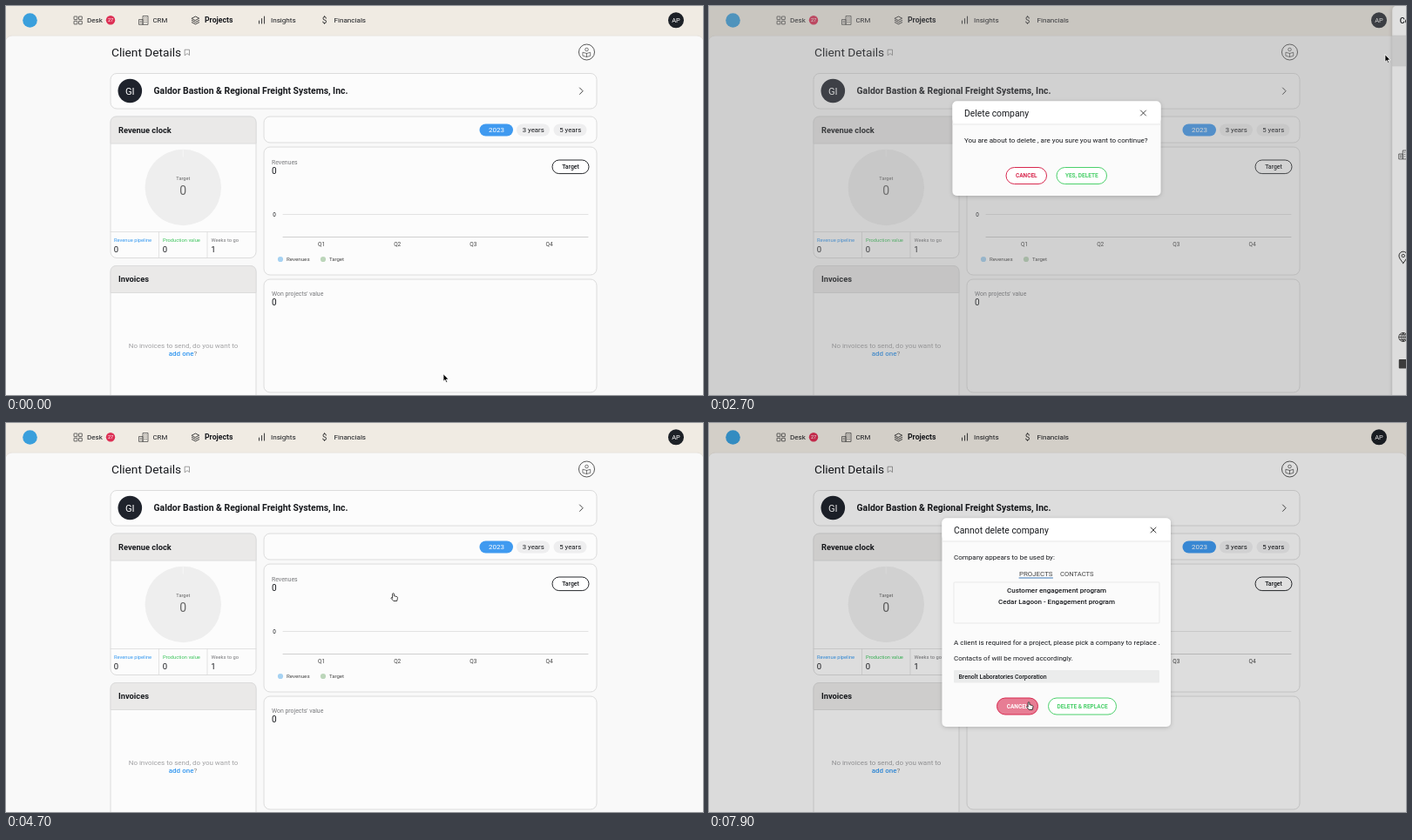
These frames come from a looping animation (800x447 px, 8 s). An HTML page:

```html
<!DOCTYPE html>
<html lang="en">
<head>
<meta charset="utf-8">
<title>Delete company</title>
<style>
html, body { margin: 0; height: 100%; overflow: hidden; background: #f9f9f9; }
svg { display: block; width: 100vw; height: 100vh; font-family: Roboto, "Open Sans", sans-serif; }
text { white-space: pre; }
</style>
</head>
<body>
<svg id="stage" viewBox="0 0 800 447"></svg>
<script>
const INK = '#17191d', GREY = '#77787b', BLUE = '#3498f0', GREEN = '#4bd06b', RED = '#d8294f';
const FIRM = ['Galdor Bastion &', 'Regional Freight', 'Systems, Inc.'];

// Text is placed by the middle of its capitals.
const text = (x, y, size, str, { fill = INK, w = 400, at = 'start', id = '' } = {}) =>
  `<text ${id && `id="${id}"`} x="${x}" y="${y + size * 0.36}" font-size="${size}" font-weight="${w}" fill="${fill}" text-anchor="${at}">${str.replace(/&/g, '&amp;')}</text>`;
const mid = (x, y, size, str, o = {}) => text(x, y, size, str, { ...o, at: 'middle' });
const box = (x, y, x2, y2, r, fill, more = '') =>
  `<rect x="${x}" y="${y}" width="${x2 - x}" height="${y2 - y}" rx="${r}" fill="${fill}" ${more}/>`;
const dot = (x, y, r, fill, more = '') => `<circle cx="${x}" cy="${y}" r="${r}" fill="${fill}" ${more}/>`;
const line = (d, color = '#333', width = 0.8, fill = 'none') =>
  `<path d="${d}" stroke="${color}" stroke-width="${width}" fill="${fill}" stroke-linejoin="round" stroke-linecap="round"/>`;
const group = (id, inner) => `<g id="${id}">${inner}</g>`;
const card = (x, y, x2, y2) => box(x, y, x2, y2, 7, '#fcfcfc', 'stroke="#dcdcdc"');
const headed = (y, y2, title) => card(120, y, 287, y2) +
  `<path d="M120 ${y + 31}V${y + 7}q0-7 7-7h153q7 0 7 7v24z" fill="#eae9e8" stroke="#dcdcdc"/>` +
  text(129, y + 15.5, 9.3, title, { w: 700 });
const cross = (x, y, r) => line(`M${x - r} ${y - r}l${2 * r} ${2 * r}m0 ${-2 * r}l${-2 * r} ${2 * r}`, '#333', 0.9);
const building = (x, y) => line(`M${x} ${y}v-5.5h4.5v5.500zM${x + 4.5} ${y}v-9.5h6v9.5zM${x + 6.3} ${y - 7.3}h.5m1.600 0h.5m-2.600 2.400h.5m1.600 0h.5m-2.600 2.400h.5m1.600 0h.5M${x + 1.6} ${y - 3.6}h1.200m-1.200 1.800h1.200`, '#444', 0.75);
const button = (id, x, x2, y, label, color) =>
  box(x, y - 9.5, x2, y + 9.5, 9.5, '#fff', `stroke="${color}"`) +
  box(x, y - 9.5, x2, y + 9.5, 9.5, color, `id="${id}Fill" opacity="0"`) +
  mid((x + x2) / 2, y, 6.5, label, { fill: color, w: 700, id: id + 'Text' });

const nav = () => box(0, 0, 800, 60, 0, '#f0ebe3') +
  box(-1, 34, 801, 470, 8, '#f9f9f9', 'stroke="#e8e4de"') +
  dot(27.5, 16.5, 8.3, '#3a9fdc') +
  [[78, 12], [83.5, 12], [78, 17.3], [83.5, 17.3]].map(([x, y]) => box(x, y, x + 3.8, y + 3.6, 0.3, 'none', 'stroke="#444" stroke-width=".8"')).join('') +
  text(93, 16.3, 8.1, 'Desk') + dot(120, 16.3, 5.2, '#dd3055') + mid(120, 16.4, 5.5, '27', { fill: '#fff' }) +
  building(152.5, 21) + text(168.5, 16.3, 7.8, 'CRM') +
  line('M213.3 14.2l4.2-2.200 4.200 2.200-4.200 2.200zM213.300 16.500l4.200 2.200 4.200-2.200M213.300 18.700l4.200 2.200 4.200-2.200', '#333', 0.9) +
  text(228, 16.3, 8.7, 'Projects', { w: 700 }) +
  line('M290.5 20v-3M293.5 20v-5.5M296.5 20v-8', '#444', 1.1) + text(304, 16.3, 8.1, 'Insights') +
  mid(365.5, 16.5, 10, '$', { fill: '#333' }) + text(376.5, 16.3, 8.1, 'Financials') +
  dot(769, 16.3, 9, '#1d2127') + mid(769, 16.4, 7.5, 'AP', { fill: '#fff' });

const page = () => nav() +
  text(121, 53, 13.7, 'Client Details') + line('M205.5 50.2h5v6.4l-2.5-2-2.5 2z', '#777', 0.7) +
  dot(666.5, 53, 9, '#fbfbfb', 'stroke="#444" stroke-width=".9"') + dot(666.5, 50, 1.8, 'none', 'stroke="#444" stroke-width=".7"') +
  line('M662.3 53.3l4.2 1.2 4.2-1.2v4l-4.2 1.2-4.2-1.2zM666.5 54.5v4', '#444', 0.7) +
  card(120, 77.5, 678, 118) + dot(142.3, 97.5, 13.8, '#1f232c') + mid(142.3, 97.8, 11.2, 'GI', { fill: '#fff' }) +
  text(169.5, 96.8, 10.4, FIRM.join(' '), { w: 700 }) + line('M658.5 94l3.6 3.7-3.6 3.7', '#444', 1) +
  headed(127, 289.5, 'Revenue clock') + dot(203.3, 208.5, 43.7, '#eeeeee') + line('M203.3 165v8', '#fafafa', 0.6) +
  mid(203.3, 198, 5.6, 'Target', { fill: '#666' }) + mid(203.3, 211.5, 14, '0', { fill: '#666' }) +
  line('M120 259.5h167M175.5 259.5v30M231 259.5v30', '#dcdcdc') +
  [[124, 'Revenue pipeline', BLUE, 0], [180, 'Production value', '#3cc45c', 0], [235.5, 'Weeks to go', GREY, 1]].map(([x, s, fill, n]) =>
    text(x, 269, 5.75, s, { fill }) + text(x - 0.3, 280, 9.5, '' + n)).join('') +
  headed(298.5, 470, 'Invoices') +
  mid(203.5, 390, 8, 'No invoices to send, do you want to', { fill: '#a2a2a4' }) +
  `<text x="203" y="402.3" font-size="8" text-anchor="middle" fill="#888"><tspan fill="${BLUE}" font-weight="500">add one</tspan>?</text>` +
  card(296, 127, 678, 157) + box(543.5, 135.5, 582, 149.5, 7, '#3f9af0') + mid(563, 142.6, 8, '2023', { fill: '#fff' }) +
  [[586, '3 years'], [628.5, '5 years']].map(([x, s]) => box(x, 135.5, x + 38, 149.5, 7, '#eeeeef') + mid(x + 19.2, 142.6, 7.8, s)).join('') +
  card(296, 162, 678, 309) + text(305, 179.3, 6.9, 'Revenues', { fill: GREY }) + text(305, 189, 10, '0') +
  box(627, 177, 669, 192.6, 7.8, '#fff', 'stroke="#26282c"') + mid(648, 185, 6.9, 'Target', { w: 500 }) +
  mid(308, 239.7, 6.3, '0') + line('M318 239.5h350', '#dedede') + line('M318 265.5h350', '#c4c4c4') +
  [1, 2, 3, 4].map(q => mid(274.8 + q * 87.2, 274, 6.5, 'Q' + q, { fill: '#444' })).join('') +
  dot(315, 291, 3.1, '#a6d2f2') + text(322, 291, 6.2, 'Revenues', { fill: '#444' }) +
  dot(364, 291, 3.1, '#bcd6ba') + text(371, 291, 6, 'Target', { fill: '#444' }) +
  card(296, 314, 678, 444) + text(305, 330.5, 6.9, "Won projects' value", { fill: GREY }) + text(305, 340.6, 10, '0');

const drawer = () => {
  const fields = [['Legal name', 221], ['Group', 251.6], ['Address', 282.3], ['Town', 313], ['ZIP', 343.5], ['Website', 374.2], ['Peerfold', 404.8], ['VAT Number', 435.3]];
  const label = (x, y, s) => text(x, y, 6.9, s, { fill: GREY, w: 500 });
  const field = (x, y, s) => label(x, y, s) + text(x, y + 10.5, 6.5, '-', { fill: '#888' });
  return box(604, 0, 812, 460, 5, '#fbfbfb', 'filter="url(#soft)"') + box(605, 0, 801, 34, 4, '#fff') +
    box(604, 34, 800, 69, 0, '#e4e4e4', 'stroke="#d8d8d8" stroke-width=".5"') +
    text(612.5, 17, 9.1, 'Company details', { w: 500 }) + text(739.5, 17, 8.2, 'Edit', { w: 500 }) + cross(782, 17, 4) +
    line('M777.5 48.5h9.5M780.5 48.5v-2h3.5v2M778.5 48.5l.4 8.7h6.8l.4-8.7', '#444', 0.9) +
    dot(699.5, 109.3, 27.5, '#20232e') + mid(699.5, 109.5, 22, 'GI', { fill: '#fff', w: 500 }) +
    box(629, 158, 715, 210, 2, '#f5f5f5') + box(725, 175, 788, 194, 2, '#f5f5f5') +
    label(637, 158, 'Name') + FIRM.map((s, i) => text(636.5, 168.3 + i * 16.4, 7.7, s, { w: 500 })).join('') +
    label(734, 174, 'Acronym') + text(733.5, 184.6, 7.8, 'GAL', { w: 500 }) +
    fields.map(([s, y]) => field(637, y, s)).join('') + field(714.5, 343.5, 'Country') +
    building(611.5, 175.5) +
    line('M616.5 295.5c-3-4-4.8-6-4.8-8.5a4.8 4.8 0 0 1 9.6 0c0 2.5-1.8 4.5-4.8 8.5z', '#333', 1) + dot(616.5, 287, 1.7, 'none', 'stroke="#333" stroke-width=".9"') +
    dot(616.5, 380.5, 5, 'none', 'stroke="#333" stroke-width=".9"') +
    line('M611.5 380.5h10M612.5 377.7h8M612.5 383.3h8M616.5 375.5v10M616.5 375.5q-5 5 0 10q5-5 0-10', '#333', 0.7) +
    box(611.5, 406, 621.5, 416.5, 1, '#444');
};

const dialog = (x, x2, y2, title, id) =>
  box(x, 109.5, x2, y2, 5, '#fbfbfb', `id="${id}" filter="url(#soft)"`) + box(x, 109.5, x2, 135, 5, '#fff') +
  line(`M${x} 136h${x2 - x}`, '#e4e4e4') + text(x + 13.5, 123, 10.35, title) + cross(x2 - 20, 123, 3);

const ask = () => dialog(279.5, 518.5, 218, 'Delete company', 'askBox') +
  text(293, 154.3, 8, 'You are about to delete , are you sure you want to continue?') +
  button('no', 341, 387.5, 195, 'CANCEL', RED) + button('yes', 399, 456.5, 195, 'YES, DELETE', GREEN) +
  text(293, 214.5, 6.8, 'Deleting...', { fill: BLUE, id: 'busy' });

const swap = () => dialog(267.5, 530, 349, 'Cannot delete company', 'swapBox') +
  text(281, 154.3, 8, 'Company appears to be used by:') +
  text(356, 173, 7.9, 'PROJECTS', { fill: '#444' }) + line('M356 178h38.5', '#3a78b8', 1) + text(403, 173, 7.6, 'CONTACTS', { fill: '#444' }) +
  box(281, 183, 517, 230, 1, '#fbfbfb', 'stroke="#e9e9e9"') + box(294.5, 186, 503, 197.5, 0, '#ebebeb', 'id="row"') +
  mid(399, 191.7, 8, 'Customer engagement program', { w: 500 }) +
  mid(399, 205.2, 8, 'Cedar Lagoon - Engagement program', { w: 500 }) +
  text(281, 251.7, 8, 'A client is required for a project, please pick a company to replace .') +
  text(281, 270.3, 8, 'Contacts of will be moved accordingly.') +
  box(281, 284, 517, 298.5, 1, '#ebecec') +
  text(286.5, 291.5, 6.9, 'Choose new client', { fill: '#555', id: 'hint' }) +
  text(286.5, 291.5, 6.9, 'Brenolt Laboratories Corporation', { w: 500, id: 'pick' }) +
  button('stop', 330.5, 377.5, 325.5, 'CANCEL', RED) +
  group('replace', button('go', 389.5, 467.5, 325.5, 'DELETE & REPLACE', GREEN));

const stage = document.getElementById('stage');
stage.innerHTML = '<filter id="soft" x="-20%" y="-20%" width="140%" height="140%"><feDropShadow dx="0" dy="1" stdDeviation="2.5" flood-opacity=".2"/></filter>' +
  page() + box(0, 0, 800, 447, 0, '#bfc0c2', 'id="tint"') + group('drawer', drawer()) +
  box(0, 0, 800, 447, 0, '#000', 'id="shade"') + group('ask', ask()) + group('swap', swap()) +
  group('status', box(-4, 442, 0, 452, 2, '#0d2a4c', 'id="statusBox"') + text(1, 447.6, 6.8, '', { fill: '#e8eef5', id: 'link' })) +
  group('arrow', line('M0 0v8.2l1.9-1.7 1.4 3 1.3-.6-1.4-2.9h2.6z', '#fff', 0.7, '#000')) +
  group('hand', line('M-.9 4.5V.7q.9-1.2 1.8 0V3.2l3.4.9q.8.5.6 1.7l-.7 3.2H.3L-2.6 5.7q.1-1.3 1.7-.2z', '#111', 0.8, '#fff'));

const $ = {};
stage.querySelectorAll('[id]').forEach(e => $[e.id] = e);
const set = (id, name, value) => $[id].setAttribute(name, value);
const show = (id, v) => set(id, 'opacity', +v);
const ramp = (t, a, b) => Math.min(1, Math.max(0, (t - a) / (b - a)));
const out = u => 1 - (1 - u) ** 2;
const pulse = (t, a, b, c, d) => ramp(t, a, b) - ramp(t, c, d);

// Pointer stops: time, x, y
const stops = [[300, 502, 423], [1000, 664, 98], [1400, 664, 98], [1900, 750.5, 45.5], [2200, 780, 51], [2450, 780, 51],
  [2700, 776, 56], [2900, 771, 60], [3650, 444.5, 195.5], [5600, 444.5, 195.5], [6300, 400, 290], [7250, 400, 290], [7800, 367, 320.5]];
function pointer(t) {
  const i = stops.findIndex(s => s[0] > t);
  if (i < 1) return (i ? stops[stops.length - 1] : stops[0]).slice(1);
  const [t0, x0, y0] = stops[i - 1], [t1, x1, y1] = stops[i];
  const u = ramp(t, t0, t1), e = u * u * (3 - 2 * u);
  return [x0 + (x1 - x0) * e, y0 + (y1 - y0) * e];
}

function draw(t) {
  const slide = out(ramp(t, 1150, 1460)) - out(ramp(t, 2400, 2820));
  set('drawer', 'transform', `translate(${(1 - slide) * 196} 0)`);
  show('drawer', slide > 0);
  show('tint', 0.32 * pulse(t, 1090, 1190, 2600, 3000));

  const first = pulse(t, 2350, 2600, 4500, 4700), second = ramp(t, 4800, 5000);
  show('shade', 0.12 * (first + second));
  show('ask', first);
  show('swap', second);

  const busy = t >= 3900, hover = ramp(t, 3600, 3800);
  set('askBox', 'height', busy ? 118.5 : 108.5);
  show('busy', busy);
  show('yesFill', hover);
  set('yesText', 'fill', hover > 0.5 ? '#fff' : GREEN);

  const picked = t >= 7000, leave = ramp(t, 7780, 7980);
  show('row', t < 5700);
  show('hint', !picked);
  show('pick', picked);
  show('replace', picked ? 1 : 0.25);
  show('stopFill', leave);
  set('stopText', 'fill', leave > 0.5 ? '#fff' : RED);

  const long = t >= 4900;
  show('status', t >= 3600 && t < 4600 || long && t < 5800);
  set('statusBox', 'width', long ? 174 : 93);
  $.link.textContent = 'https://app.example.com/#' + (long ? '/pipeline/project/64-2022' : '');

  const [x, y] = pointer(t), hand = t >= 3600 && t < 5700 || t >= 7750;
  show('arrow', !hand);
  show('hand', hand);
  set('arrow', 'transform', `translate(${x} ${y})`);
  set('hand', 'transform', `translate(${x} ${y})`);
}

const start = performance.now();
function tick() {
  draw((performance.now() - start) % 8000);
  requestAnimationFrame(tick);
}
tick();
</script>
</body>
</html>
```
